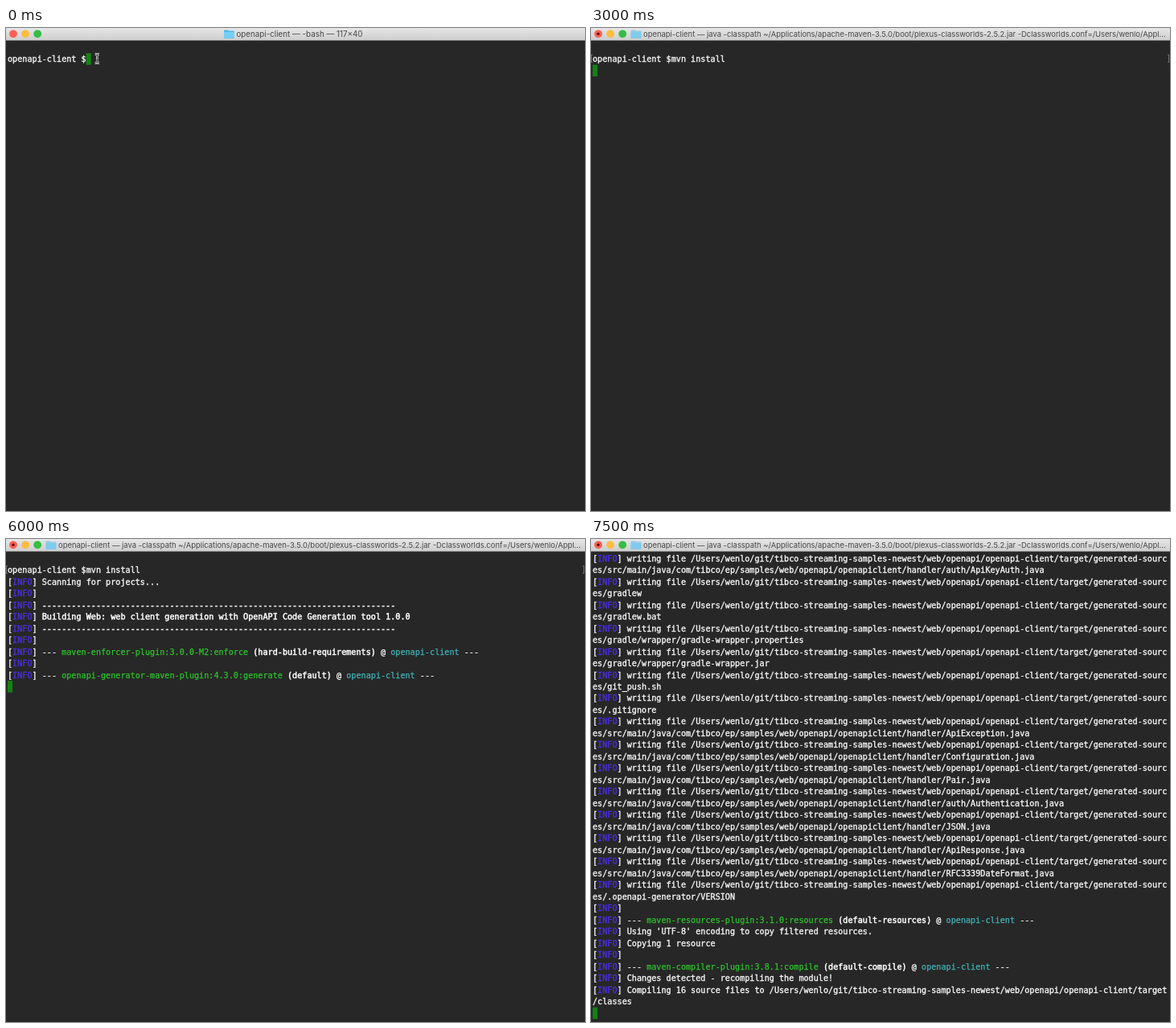
Animation of 720x600 px, one loop 8000 ms. Source, as an HTML page with a canvas:

```html
<!DOCTYPE html>
<html lang="en">
<head>
<meta charset="utf-8">
<title>Terminal</title>
<style>
  html, body { margin: 0; width: 100%; height: 100%; overflow: hidden; background: #272727; }
  canvas { display: block; }
</style>
</head>
<body>
<canvas id="stage" width="720" height="600"></canvas>
<script>
const ctx = document.getElementById('stage').getContext('2d');

const LOOP = 8000, STEP = 500;
const COLS = 117, CELL_W = 6.105, CELL_H = 14.49, LEFT = 2, TOP = 16.7;
const MONO = '10.14px "DejaVu Sans Mono", monospace';
// The outline thickens the glyphs a little
const STYLES = {
  n: { color: '#f8f8f8', outline: 0.35 },
  w: { color: '#ffffff', outline: 0.5 },
  b: { color: '#4a2fe0', outline: 0.35 },
  y: { color: '#e4e46c', outline: 0.6 },
  g: { color: '#2cc42c', outline: 0.25 },
  c: { color: '#41b4b8', outline: 0.25 }
};

// Log text; <x>...</> marks a run in style x
const USER = 'wenlo';
const PROMPT = 'openapi-client $';
const COMMAND = 'mvn install';
const INFO = '[<b>INFO</>] ';
const RULE = `${INFO}<w>${'-'.repeat(72)}</>`;
const PROJECT = `/Users/${USER}/git/tibco-streaming-samples-newest/web/openapi/openapi-client/target`;
const HANDLER = 'src/main/java/com/tibco/ep/samples/web/openapi/openapiclient/handler/';

const plugin = (goal, id) =>
  `${INFO}--- <g>${goal}</> <w>(${id})</> @ <c>openapi-client</> ---`;
const writing = path => `${INFO}writing file ${PROJECT}/generated-sources/${path}`;
const java = name => writing(`${HANDLER}${name}.java`);

const startLog = [
  '',
  PROMPT + COMMAND,
  INFO + 'Scanning for projects...',
  INFO,
  RULE,
  INFO + '<w>Building Web: web client generation with OpenAPI Code Generation tool 1.0.0</>',
  RULE,
  INFO,
  plugin('maven-enforcer-plugin:3.0.0-M2:enforce', 'hard-build-requirements'),
  INFO,
  plugin('openapi-generator-maven-plugin:4.3.0:generate', 'default')
];

const buildLog = [
  '[<y>WARNING</>] Empty operationId found for path: get /status. Renamed to auto-generated operationId: statusGet',
  java('GetTheNodeStatusApi'),
  ...['docs/GetTheNodeStatusApi.md', '.travis.yml'].map(writing),
  ...['ApiClient', 'ServerConfiguration', 'ServerVariable', 'StringUtil',
    'auth/HttpBasicAuth', 'auth/HttpBearerAuth', 'auth/ApiKeyAuth'].map(java),
  ...['gradlew', 'gradlew.bat', 'gradle/wrapper/gradle-wrapper.properties',
    'gradle/wrapper/gradle-wrapper.jar', 'git_push.sh', '.gitignore'].map(writing),
  ...['ApiException', 'Configuration', 'Pair', 'auth/Authentication', 'JSON',
    'ApiResponse', 'RFC3339DateFormat'].map(java),
  writing('.openapi-generator/VERSION'),
  INFO,
  plugin('maven-resources-plugin:3.1.0:resources', 'default-resources'),
  INFO + "Using 'UTF-8' encoding to copy filtered resources.",
  INFO + 'Copying 1 resource',
  INFO,
  plugin('maven-compiler-plugin:3.8.1:compile', 'default-compile'),
  INFO + 'Changes detected - recompiling the module!',
  `${INFO}Compiling 16 source files to ${PROJECT}/classes`
];

function toRows(line) {
  const cells = [];
  let style = 'n';
  for (const part of line.split(/(<\w>|<\/>)/)) {
    if (part === '</>') style = 'n';
    else if (/^<\w>$/.test(part)) style = part[1];
    else for (const ch of part) cells.push({ ch, style });
  }
  const rows = [];
  do rows.push(cells.splice(0, COLS)); while (cells.length);
  return rows;
}

const startRows = startLog.flatMap(toRows);
const buildRows = buildLog.flatMap(toRows);

const typedAt = [0, 1, 3, 6, 9, 11];
const startRowsAt = { 6: 2, 7: 2, 8: 3, 9: 7 };

function screenAt(step) {
  if (step < typedAt.length) {
    const typed = PROMPT + COMMAND.slice(0, typedAt[step]);
    return { rows: ['', typed].flatMap(toRows), row: 1, col: typed.length };
  }
  const rows = step < 13 ? startRows.slice(0, startRowsAt[step])
    : step === 13 ? buildRows.slice(0, 39)
    : buildRows.slice(-39);
  return { rows, row: rows.length, col: 0 };
}

function disc(x, y, r, color) {
  ctx.fillStyle = color;
  ctx.beginPath();
  ctx.arc(x, y, r, 0, Math.PI * 2);
  ctx.fill();
}

function drawFolder(x, faded) {
  ctx.globalAlpha = faded ? 0.55 : 1;
  ctx.fillStyle = '#55b9ea';
  ctx.beginPath();
  ctx.roundRect(x, 2.5, 6, 4, 1);
  ctx.roundRect(x, 3.5, 13, 9.5, 1);
  ctx.fill();
  ctx.fillStyle = '#74cff8';
  ctx.fillRect(x, 5, 13, 7.5);
  ctx.globalAlpha = 1;
}

function drawTitleBar(busy) {
  const bar = ctx.createLinearGradient(0, 0, 0, 15);
  bar.addColorStop(0, '#e6e6e6');
  bar.addColorStop(1, '#cecece');
  ctx.fillStyle = bar;
  ctx.fillRect(0, 0, 720, 15);
  ctx.fillStyle = '#a5a5a5';
  ctx.fillRect(0, 15, 720, 0.6);

  ['#fb5f57', '#fcbc40', '#35bd44'].forEach((color, i) => disc(9 + i * 15.1, 7.3, 4.9, color));
  if (busy) disc(9, 7.3, 1.7, '#5c0b08');

  drawFolder(busy ? 49.5 : 271, busy);
  ctx.fillStyle = '#484848';
  ctx.font = `${busy ? 9.43 : 9.8}px Inter, sans-serif`;
  const title = busy
    ? '— java -classpath ~/Applications/apache-maven-3.5.0/boot/plexus-classworlds-2.5.2.jar ' +
      `-Dclassworlds.conf=/Users/${USER}/Appl...`
    : '— -bash — 117×40';
  ctx.fillText('openapi-client ' + title, busy ? 65 : 286.5, 10.9);
}

function drawRows(rows) {
  ctx.font = MONO;
  ctx.lineJoin = 'round';
  rows.forEach((cells, r) => {
    const y = TOP + r * CELL_H + 10.9;
    cells.forEach(({ ch, style }, c) => {
      if (ch === ' ') return;
      const { color, outline } = STYLES[style];
      const x = LEFT + c * CELL_W;
      ctx.fillStyle = ctx.strokeStyle = color;
      ctx.lineWidth = outline;
      ctx.fillText(ch, x, y);
      ctx.strokeText(ch, x, y);
    });
  });
}

function drawCommandMarks() {
  ctx.strokeStyle = '#8a8a8a';
  ctx.lineWidth = 0.8;
  ctx.beginPath();
  for (const [edge, inner] of [[0.4, 2], [718.6, 717]]) {
    ctx.moveTo(inner, 33.4);
    ctx.lineTo(edge, 33.4);
    ctx.lineTo(edge, 42.6);
    ctx.lineTo(inner, 42.6);
  }
  ctx.stroke();
}

function drawPointer(x, y) {
  for (const [color, width] of [['#e8e8e8', 2.6], ['#222222', 0.9]]) {
    ctx.strokeStyle = color;
    ctx.lineWidth = width;
    ctx.beginPath();
    for (const s of [-1, 1]) {
      ctx.moveTo(x - 2.6, y + s * 5.6);
      ctx.quadraticCurveTo(x, y + s * 5.5, x, y + s * 3.5);
      ctx.quadraticCurveTo(x, y + s * 5.5, x + 2.6, y + s * 5.6);
    }
    ctx.moveTo(x, y - 4);
    ctx.lineTo(x, y + 4);
    ctx.moveTo(x - 1.2, y + 1.8);
    ctx.lineTo(x + 1.2, y + 1.8);
    ctx.stroke();
  }
}

function draw(step) {
  const { rows, row, col } = screenAt(step);
  const busy = step >= 6;
  ctx.fillStyle = '#272727';
  ctx.fillRect(0, 0, 720, 600);
  drawTitleBar(busy);
  ctx.fillStyle = '#138213';
  ctx.fillRect(LEFT + col * CELL_W, TOP + row * CELL_H, CELL_W, CELL_H);
  drawRows(rows);
  if (busy && step < 13) drawCommandMarks();
  if (step === 0) drawPointer(113.3, 38);
}

let shown = -1;
function tick() {
  const step = Math.floor((performance.now() % LOOP) / STEP);
  if (step !== shown) draw(shown = step);
  requestAnimationFrame(tick);
}
tick();
</script>
</body>
</html>
```
